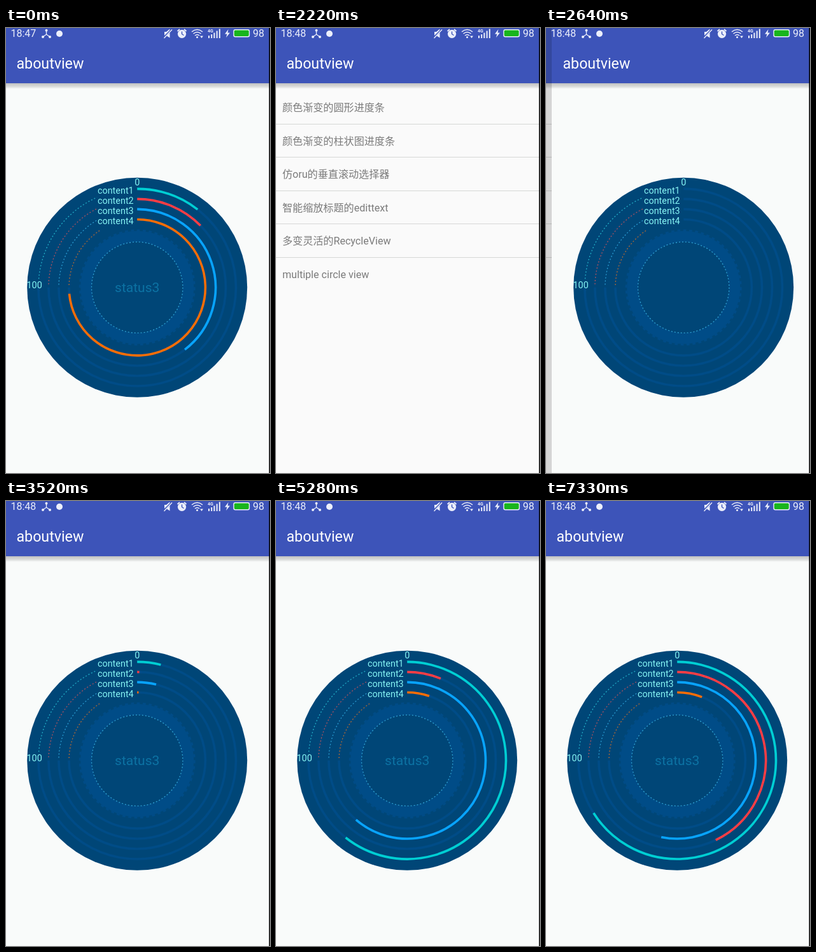
These frames come from a looping animation (415x701 px, 8000 ms). An HTML page:

```html
<!DOCTYPE html>
<html lang="zh-CN">
<head>
<meta charset="utf-8">
<title>aboutview</title>
<style>
  html, body { margin: 0; width: 100%; height: 100%; overflow: hidden; background: #fafbfa; }
  svg { display: block; width: 100%; height: 100%; }
  text { font-family: Roboto, "Noto Sans CJK SC", "Noto Sans CJK", sans-serif; white-space: pre; }
  .title { font-size: 23.2px; fill: #fff; }
  .row { font-size: 16.1px; fill: #7b7b7b; }
  .label { font-size: 14.4px; fill: #86f3f3; }
  .status { font-size: 21px; fill: #0c72a3; }
  .bar { font-size: 16px; fill: #eceffb; }
</style>
</head>
<body>
<svg viewBox="0 0 415 701" preserveAspectRatio="none">
  <defs>
    <linearGradient id="shade" x2="0" y2="1">
      <stop offset="0" stop-color="#000" stop-opacity=".23"/>
      <stop offset=".6" stop-color="#000" stop-opacity=".12"/>
      <stop offset="1" stop-color="#000" stop-opacity="0"/>
    </linearGradient>
  </defs>

  <g id="list"></g>
  <rect id="dim" width="415" height="701"/>
  <g id="page"></g>

  <g id="statusbar" fill="#eceffb" stroke="none">
    <text id="clock" class="bar" x="7.5" y="14"></text>
    <!-- hub -->
    <path d="M63.5 4V10L58 14M63.5 10L69 14" fill="none" stroke="#eceffb" stroke-width="1.3"/>
    <circle cx="63.5" cy="3.8" r="2"/><circle cx="58" cy="14" r="2"/><circle cx="69" cy="14" r="2"/>
    <circle cx="84" cy="9" r="5"/>
    <!-- mute -->
    <path d="M249 6H252L257.500 1.500V15.500L252 12H249Z"/>
    <path d="M248 15L261 2" stroke="#3d54b9" stroke-width="3"/>
    <path d="M248.500 16L261 2.500" stroke="#eceffb" stroke-width="1.4"/>
    <!-- alarm -->
    <circle cx="276.500" cy="9.300" r="6.600"/>
    <path d="M269.500 5L273 2M283.500 5L280 2" stroke="#eceffb" stroke-width="1.8"/>
    <path d="M276.500 5.500V9.500L279.500 11.500" fill="none" stroke="#3d54b9" stroke-width="1.4"/>
    <!-- wifi -->
    <g fill="none" stroke="#eceffb" stroke-width="1.6">
      <path d="M292 6Q300.500 -1 309 6M294.500 9Q300.500 4 306.500 9M297 12Q300.500 9 304 12"/>
    </g>
    <circle cx="300.500" cy="14.500" r="1.500"/>
    <path id="net" d="M305 12.500H310L307.500 16Z"/>
    <!-- signal -->
    <text x="317" y="6.500" font-size="7" font-weight="700">4G</text>
    <path d="M318 12h2v4h-2zM322.200 10h2v6h-2zM326.400 7.500h2v8.500h-2zM330.600 4.500h2v11.500h-2zM334.800 1.500h2v14.500h-2z"/>
    <!-- charge -->
    <path d="M349.500 2L344 9.500H347.500L346 15L352 7.500H348.500Z"/>
    <rect x="358" y="2.700" width="24.500" height="11" rx="2.500" fill="#18b51c" stroke="#eceffb" stroke-width="1.400"/>
    <text class="bar" x="388" y="14">98</text>
  </g>
  <rect x="413.500" width="1.500" height="701" fill="#000"/>
</svg>

<script>
const NS = 'http://www.w3.org/2000/svg';
const $ = id => document.getElementById(id);
const LOOP = 8000, CX = 206.2, CY = 408.7;
const DISC = '#004677', TRACK = '#004c87';
const RINGS = [
  { r: 155.3, color: '#00cfd3', dots: [275, 336], dotColor: '#22adc6' },
  { r: 139.3, color: '#fc3d44', dots: [272, 333], dotColor: '#b0525f' },
  { r: 123.3, color: '#08a4ff', dots: [272, 329], dotColor: '#2a9bd0' },
  { r: 107.2, color: '#fb6d04', dots: [272, 326.5], dotColor: '#b06a35' }
];
const ROWS = ['颜色渐变的圆形进度条', '颜色渐变的柱状图进度条', '仿oru的垂直滚动选择器',
  '智能缩放标题的edittext', '多变灵活的RecycleView', 'multiple circle view'];

// sweep angles in degrees
const BEFORE = [37.7, 45.6, 142.6, 264.7];
const ZERO = [0, 0, 0, 0];
const FIRST = [218.5, 22.2, 220.7, 18.9];
const SECOND = [237.8, 154.2, 191.7, 21.3];
const GROW = 1420, START1 = 3290, START2 = 5460;

// moments at which the screen refreshes
const TICKS = [0, 120, 650, 770, 920, 1070, 2220, 2490, 2640, 2790, 3220, 3370,
  3520, 3640, 3760, 3910, 4030, 4150, 4300, 4420, 4570, 4720, 5280, 5430, 5550, 5700,
  5850, 5970, 6120, 6240, 6390, 6510, 6660, 6780, 7180, 7330];
// [time, page offset]
const SLIDE = [[0, 0], [650, 130], [770, 358], [920, 416], [2490, 312], [2640, 10], [2790, 0]];
const NET_ON = [[0, 120], [920, 1070], [2220, 3910], [4030, 6660], [6780, LOOP]];

function add(parent, tag, attrs, text) {
  const el = document.createElementNS(NS, tag);
  for (const k in attrs) el.setAttribute(k, attrs[k]);
  if (text) el.textContent = text;
  parent.append(el);
  return el;
}

function point(r, deg) {
  const a = deg * Math.PI / 180;
  return (CX + r * Math.sin(a)).toFixed(2) + ' ' + (CY - r * Math.cos(a)).toFixed(2);
}

function arc(r, from, to) {
  return `M${point(r, from)}A${r} ${r} 0 ${to - from > 180 ? 1 : 0} 1 ${point(r, to)}`;
}

// each screen bleeds one pixel past its left edge
function screen(parent, bg) {
  add(parent, 'rect', { x: -1, width: 416, height: 701, fill: bg });
  add(parent, 'rect', { x: -1, y: 87, width: 416, height: 9, fill: 'url(#shade)' });
  add(parent, 'rect', { x: -1, width: 416, height: 87, fill: '#3d54b9' });
  add(parent, 'text', { class: 'title', x: 16.5, y: 64 }, 'aboutview');
}

function circle(parent, r, attrs) {
  return add(parent, 'circle', { cx: CX, cy: CY, r, fill: 'none', ...attrs });
}

const list = $('list'), page = $('page');

screen(list, '#fafafa');
ROWS.forEach((name, i) => {
  const y = 131 + i * 52.6;
  add(list, 'text', { class: 'row', x: 10, y }, name);
  if (i < 5) add(list, 'rect', { x: 0, y: Math.round(y + 19.6), width: 415, height: 1, fill: '#d6d7d6' });
});

screen(page, '#f9fbfa');
circle(page, 173, { fill: DISC });
for (const { r, dots, dotColor } of RINGS) {
  add(page, 'path', { d: arc(r, 0, 270), fill: 'none', stroke: TRACK, 'stroke-width': 3.6 });
  add(page, 'path', { d: arc(r, ...dots), fill: 'none', stroke: dotColor, 'stroke-width': 1.3, 'stroke-dasharray': '2 3' });
}
circle(page, 89, { fill: TRACK });
circle(page, 90, { stroke: TRACK, 'stroke-width': 3, 'stroke-dasharray': '4.7 4.7' });
circle(page, 71.7, { fill: DISC, stroke: '#2f9fcf', 'stroke-width': 1.3, 'stroke-dasharray': '2 3' });
const arcs = RINGS.map(({ color }) => add(page, 'path', { fill: 'none', stroke: color, 'stroke-width': 3.6 }));
RINGS.forEach((_, i) =>
  add(page, 'text', { class: 'label', x: 200.7, y: 261 + i * 16, 'text-anchor': 'end' }, 'content' + (i + 1)));
add(page, 'text', { class: 'label', x: CX, y: 248, 'text-anchor': 'middle' }, '0');
add(page, 'text', { class: 'label', x: 32.5, y: 409.5 }, '100');
const status = add(page, 'text', { class: 'status', x: CX, y: 416, 'text-anchor': 'middle' }, 'status3');

const ease = p => (1 - Math.cos(Math.PI * Math.min(1, Math.max(0, p)))) / 2;

function sweeps(t) {
  if (t < 2490) return BEFORE;
  const [a, b, start] = t < START2 ? [ZERO, FIRST, START1] : [FIRST, SECOND, START2];
  const k = ease((t - start) / GROW);
  return a.map((v, i) => v + (b[i] - v) * k);
}

function draw(time) {
  const t = TICKS.findLast(v => v <= time);
  const off = SLIDE.findLast(s => s[0] <= t)[1];
  page.setAttribute('transform', `translate(${off} 0)`);
  $('dim').setAttribute('opacity', t >= 2490 ? 0.155 * (1 - off / 312) : 0);
  sweeps(t).forEach((deg, i) => arcs[i].setAttribute('d', deg > 0.05 ? arc(RINGS[i].r, 0, deg) : ''));
  status.setAttribute('visibility', t < 2490 || t >= 3220 ? 'visible' : 'hidden');
  $('clock').textContent = t < 2220 ? '18:47' : '18:48';
  $('net').setAttribute('opacity', NET_ON.some(([a, b]) => t >= a && t < b) ? 1 : 0.35);
}

const begin = performance.now();
function frame() {
  draw((performance.now() - begin) % LOOP);
  requestAnimationFrame(frame);
}
frame();
</script>
</body>
</html>
```
